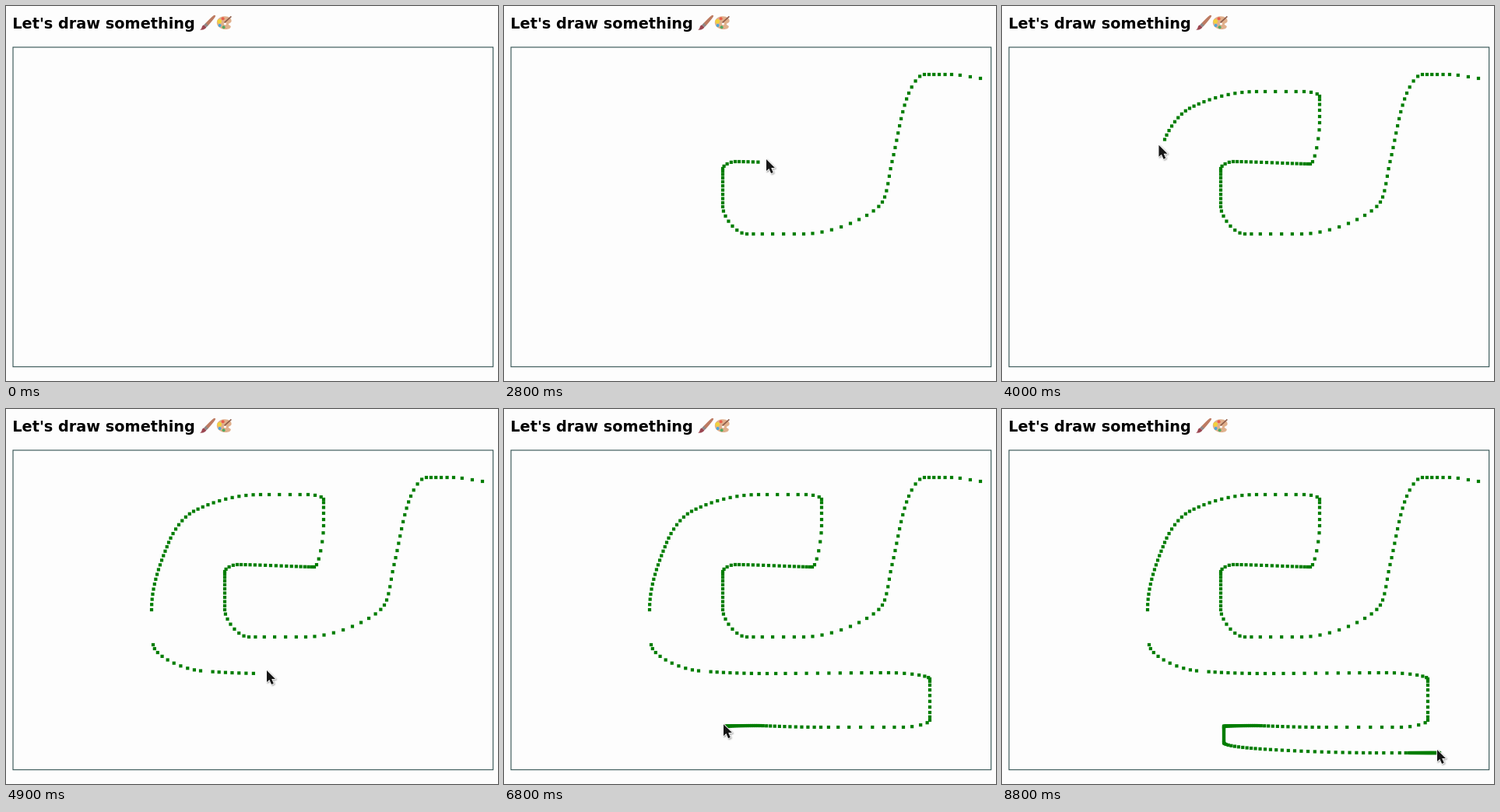
Write an HTML page with a canvas that moves like this. It is 632 px wide and 482 px high and loops after 8.9 s.

```html
<!DOCTYPE html>
<html lang="en">
<head>
<meta charset="utf-8">
<title>Let's draw something</title>
<style>
  html, body { margin: 0; width: 632px; height: 482px; overflow: hidden; background: #fdfdfd; }
  svg, canvas { position: absolute; left: 0; top: 0; display: block; }
  text { font: bold 19.3px "DejaVu Sans", sans-serif; }
</style>
</head>
<body>
<svg width="632" height="482" viewBox="0 0 632 482">
  <text x="8.3" y="29">Let's draw something</text>
  <g id="brush">
    <path d="M266.5 12.2Q268.6 11 269.2 12.8Q269 14.6 259.6 25.2L256.2 22.2Q262.6 15.4 266.5 12.2Z" fill="#bd7b62"/>
    <path d="M256.6 21.8L259.9 24.9L257.4 27.2L254.2 24.2Z" fill="#8d8785"/>
    <path d="M254.2 24.2L257.4 27.2Q255.6 30.8 249.2 30.8Q251.8 28.8 251.6 27Q252.2 24.6 254.2 24.2Z" fill="#9b4650"/>
  </g>
  <g id="palette">
    <path d="M280 13.2C286 12.6 290 16 289.6 19.4C289.3 22 286 21.6 285.8 23.4C285.7 24.8 288.8 24.6 288.8 26.6C288.6 29.6 283.6 30.4 280.4 29.9C274 29 270.6 25.2 270.8 21C271 16.6 274.8 13.6 280 13.2Z" fill="#e0b08c"/>
    <circle cx="278.6" cy="16.2" r="2" fill="#e8604a"/>
    <circle cx="274.2" cy="19.8" r="2.8" fill="#f2d23c"/>
    <circle cx="274.6" cy="25" r="2" fill="#4ea7d8"/>
    <circle cx="279.6" cy="27.2" r="2" fill="#55a861"/>
    <circle cx="281.4" cy="22.8" r="1.6" fill="#fdfdfd"/>
    <path d="M289.4 13.4L280.6 21.4" stroke="#8c5c4a" stroke-width="1.6"/>
  </g>
  <rect x="9" y="53" width="616.7" height="410.7" fill="none" stroke="#2f4f4f" stroke-width="1.1"/>
</svg>
<canvas id="board" width="632" height="482"></canvas>
<script>
const LOOP = 8900, FRAME = 100, START = 1100;
const SAMPLE = 24, LEAD = 2, LAST = 320, DOT = 4.2;

// Key points of the stroke: [mouse sample, x, y]
const keys = [
  [0, 612, 93], [3, 575, 88], [8, 540, 88], [12, 520, 112], [22, 498.5, 200],
  [28, 486, 252], [38, 385, 293], [44, 312, 293], [51, 281, 258], [61, 281, 209],
  [65, 297, 200], [82, 396, 203], [88, 408, 150], [93, 408, 116], [96, 388, 110],
  [101, 327, 110], [112, 241, 131.5], [120, 209, 171.5], [134, 187, 258],
  [140, 189, 303], [149, 250, 336.5], [159, 338, 340], [171, 494, 339],
  [178, 547, 347], [187, 547, 400], [191, 513, 409], [199, 407, 409],
  [212, 326, 407], [236, 285, 408], [249, 285, 429], [258, 320, 436],
  [278, 481, 442], [283, 523, 442], [LAST, 562, 442]
];
const penUp = i => (i > 134 && i < 140) || i === 150;

const slope = (k, c) => (keys[k + 1][c] - keys[k][c]) / (keys[k + 1][0] - keys[k][0]);

// Harmonic mean keeps the curve free of overshoot at corners
function tangent(k, c) {
  if (k === 0) return slope(0, c);
  if (k === keys.length - 1) return slope(k - 1, c);
  const a = slope(k - 1, c), b = slope(k, c);
  return a * b > 0 ? 2 * a * b / (a + b) : 0;
}

function coord(i, c) {
  let k = 0;
  while (k < keys.length - 2 && i >= keys[k + 1][0]) k++;
  const a = keys[k], b = keys[k + 1];
  const h = b[0] - a[0], u = (i - a[0]) / h, v = 1 - u;
  return a[c] + (b[c] - a[c]) * u * u * (3 - 2 * u)
    + h * u * v * (v * tangent(k, c) - u * tangent(k + 1, c));
}

const points = Array.from({ length: LAST + 1 }, (_, i) => [coord(i, 1), coord(i, 2)]);

const ctx = document.getElementById("board").getContext("2d");
const arrow = new Path2D("M0 0V15L3.4 11.9L6.1 18L8.8 16.8L6.2 10.9H11Z");

function drawPointer([x, y]) {
  ctx.save();
  ctx.translate(x - 3, y - 4);
  ctx.lineJoin = "round";
  ctx.shadowColor = "rgba(0,0,0,.4)";
  ctx.shadowBlur = 2;
  ctx.shadowOffsetX = ctx.shadowOffsetY = 1;
  ctx.lineWidth = 1.6;
  ctx.strokeStyle = "#fff";
  ctx.stroke(arrow);
  ctx.shadowColor = "transparent";
  ctx.fillStyle = "#161616";
  ctx.fill(arrow);
  ctx.restore();
}

function draw(t) {
  ctx.clearRect(0, 0, 632, 482);
  if (t < START) return;
  const last = Math.floor((t - START - 20) / SAMPLE);
  ctx.fillStyle = "#007d00";
  for (let i = 0; i <= last; i++) {
    const [x, y] = points[i];
    if (!penUp(i)) ctx.fillRect(x - DOT / 2, y - DOT / 2, DOT, DOT);
  }
  drawPointer(points[Math.min(LAST, last + LEAD)]);
}

let shown = -1;
const begin = performance.now();
function tick() {
  const step = Math.floor((performance.now() - begin) % LOOP / FRAME);
  if (step !== shown) draw((shown = step) * FRAME);
  requestAnimationFrame(tick);
}
tick();
</script>
</body>
</html>
```
